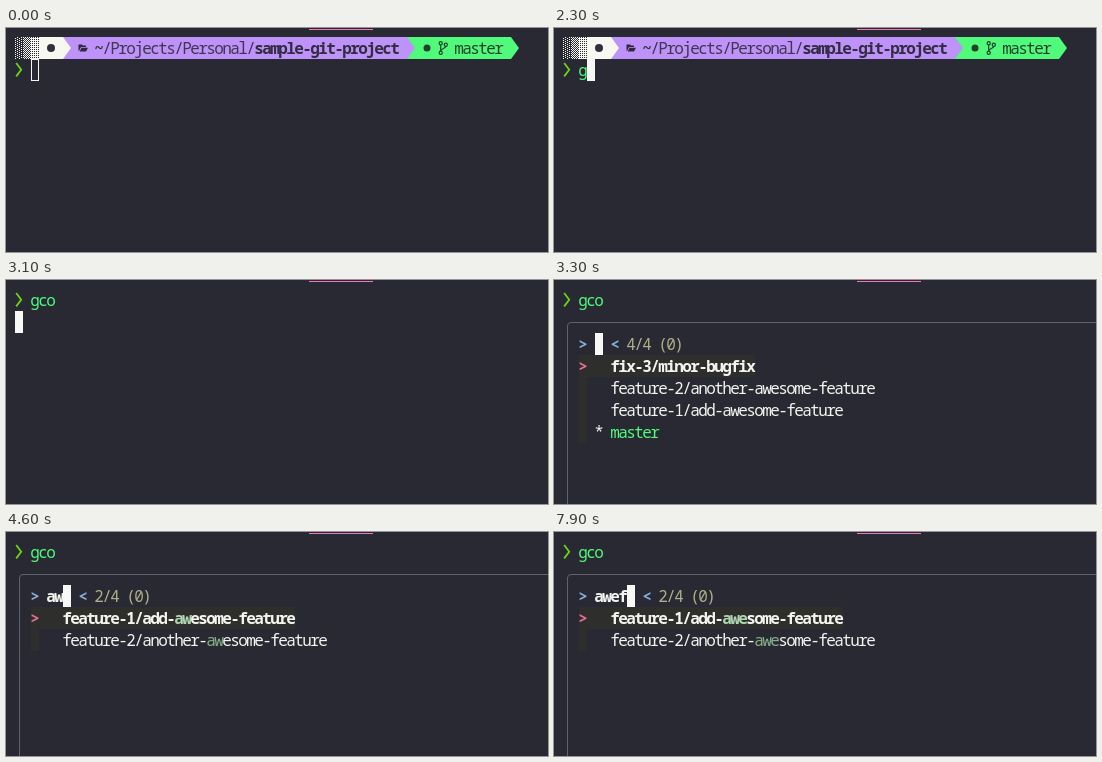
Animation of 542 by 224 pixels, one loop 8 s. Source, as an HTML page:

```html
<!DOCTYPE html>
<html lang="en">
<head>
<meta charset="utf-8">
<title>Branch picker in a terminal</title>
<style>
  html, body { margin: 0; width: 100%; height: 100%; overflow: hidden; background: #282933; }
  #stage { position: relative; width: 542px; height: 224px; overflow: hidden; background: #282933; }
  #stage * { position: absolute; }
  #stage .text span { position: static; }
  #screen, svg { left: 0; top: 0; width: 542px; height: 224px; }
  .tab { left: 303px; top: 1px; width: 64px; height: 1px; background: #f573bd; }

  /* Every glyph sits on an 8 by 22 px grid. */
  .text {
    font: 16px/22px "Noto Sans Mono", "DejaVu Sans Mono", monospace;
    letter-spacing: calc(8px - 1ch);
    text-indent: calc((8px - 1ch) / 2);
    white-space: pre;
    color: #f4f4ef;
  }
  .bold { font-weight: 700; }
  .path { color: #40364f; }
  .path .bold { color: #332d42; }
  .branch { color: #24402f; }
  .green { color: #50fa7b; }
  .blue { color: #87afd7; font-weight: 700; }
  .info { color: #afaf87; }
  .pointer { color: #ea7096; font-weight: 700; }
  .hit { color: #87af87; }
  .bold .hit { color: #afd7af; }
  .cursor { background: #f8f8f6; }
  .hollow { box-sizing: border-box; border: 1px solid #f8f8f2; }
  .shade { background: #2e2e2d; }
  .frame { left: 13px; top: 42px; width: 560px; height: 220px; border: 1px solid #62626a; border-radius: 4px; }
</style>
</head>
<body>
<div id="stage">
  <div id="header">
    <svg viewBox="0 0 542 224">
      <defs>
        <pattern id="light" width="4" height="2" patternUnits="userSpaceOnUse">
          <path d="M1 0h1v1h-1zM3 1h1v1h-1z" fill="#f8f8f2"/>
        </pattern>
        <pattern id="medium" width="2" height="2" patternUnits="userSpaceOnUse">
          <path d="M0 0h1v1h-1zM1 1h1v1h-1z" fill="#f8f8f2"/>
        </pattern>
        <pattern id="dense" width="2" height="2" patternUnits="userSpaceOnUse">
          <path d="M0 0h2v1h-2zM1 1h1v1h-1z" fill="#f8f8f2"/>
        </pattern>
      </defs>
      <g shape-rendering="crispEdges">
        <rect x="9" y="9" width="8" height="22" fill="url(#light)"/>
        <rect x="17" y="9" width="8" height="22" fill="url(#medium)"/>
        <rect x="25" y="9" width="8" height="22" fill="url(#dense)"/>
      </g>
      <path d="M401 9H505L513 20L505 31H401z" fill="#50fa7b"/>
      <path d="M57 9H401L409 20L401 31H57z" fill="#bd93f9"/>
      <path d="M33 9H57L65 20L57 31H33z" fill="#f8f8f2"/>
      <circle cx="45" cy="20" r="4" fill="#30313a"/>
      <path d="M72.5 23V16.5H76L77 17.5H80V19H75L73 23zM75.5 19.7H82L80 23.5H73.7z" fill="#30293d"/>
      <circle cx="421" cy="20" r="3.5" fill="#24402f"/>
      <g fill="none" stroke="#24402f" stroke-width="1.2">
        <circle cx="434.7" cy="15.2" r="1.6"/>
        <circle cx="434.7" cy="24.8" r="1.6"/>
        <circle cx="439.8" cy="16.7" r="1.6"/>
        <path d="M434.7 16.8V23.2M439.8 18.3C439.8 21 435 20 434.7 23"/>
      </g>
    </svg>
    <div class="text path" style="left:89px;top:9px"><span class="bold">~</span>/Projects/Personal/<span class="bold">sample-git-project</span></div>
    <div class="text branch" style="left:449px;top:9px">master</div>
  </div>
  <div id="screen"></div>
  <div class="tab"></div>
</div>

<script>
const LOOP = 8000;
const header = document.getElementById("header");
const screen = document.getElementById("screen");

const at = (col, row) => `left:${9 + 8 * col}px;top:${9 + 22 * row}px`;
const put = (col, row, text, style = "") =>
  `<div class="text ${style}" style="${at(col, row)}">${text}</div>`;
const block = (col, row, style, cols = 1, rows = 1) =>
  `<div class="${style}" style="${at(col, row)};width:${8 * cols}px;height:${22 * rows}px"></div>`;

const chevron = row =>
  `<svg viewBox="0 0 542 224"><path transform="translate(9 ${9 + 22 * row})"
    d="M1.2 4L6.2 10.7L1.2 17.4" fill="none" stroke="#6bd414" stroke-width="1.8"/></svg>`;

const shell = (row, command) => chevron(row) + put(2, row, command, "green");

const typing = (command, cursor = "cursor") => ({
  header: true,
  html: shell(1, command) + block(2 + command.length, 1, cursor)
});

// Marks the matched letters, starting at a given place in the name.
const mark = (name, start, length) => length
  ? name.slice(0, start) + `<span class="hit">${name.slice(start, start + length)}</span>` + name.slice(start + length)
  : name;

const FIX = "fix-3/minor-bugfix";
const ANOTHER = "feature-2/another-awesome-feature";
const ADD = "feature-1/add-awesome-feature";
const MASTER = "master";

const picker = (query, items) => {
  const end = 4 + query.length;
  const rows = items.map(([name, start, length], i) => {
    const current = name === MASTER;
    return (current ? put(4, 3 + i, "*") : "") +
      put(6, 3 + i, mark(name, start, length), i === 0 ? "bold" : current ? "green" : "");
  });
  return {
    html: shell(0, "gco") + '<div class="frame"></div>' +
      block(2, 3, "shade", 1, items.length) +
      block(2, 3, "shade", 4 + items[0][0].length) +
      put(2, 2, "&gt;", "blue") + put(4, 2, query, "bold") + block(end, 2, "cursor") +
      put(end + 2, 2, "&lt;", "blue") + put(end + 4, 2, `${items.length}/4 (0)`, "info") +
      put(2, 3, "&gt;", "pointer") + rows.join("")
  };
};

const all = [[FIX], [ANOTHER], [ADD], [MASTER]];
const withA = [[ADD, 10, 1], [ANOTHER, 10, 1], [MASTER, 1, 1]];
const awesome = length => [[ADD, 14, length], [ANOTHER, 18, length]];

const scenes = [
  [0, typing("", "hollow")],
  [100, typing("")],
  [2300, typing("g")],
  [2600, typing("gc")],
  [2800, typing("gco")],
  [3100, { html: shell(0, "gco") + block(0, 1, "cursor") }],
  [3200, picker("", all)],
  [4200, picker("a", all)],
  [4300, picker("a", withA)],
  [4400, picker("aw", withA)],
  [4500, picker("aw", awesome(2))],
  [4800, picker("awe", awesome(2))],
  [4900, picker("awe", awesome(3))],
  [7900, picker("awef", awesome(3))]
];

let shown;
function draw() {
  const time = performance.now() % LOOP;
  const [, scene] = scenes.findLast(([start]) => start <= time);
  if (scene !== shown) {
    shown = scene;
    header.style.display = scene.header ? "block" : "none";
    screen.innerHTML = scene.html;
  }
  requestAnimationFrame(draw);
}
draw();
</script>
</body>
</html>
```
